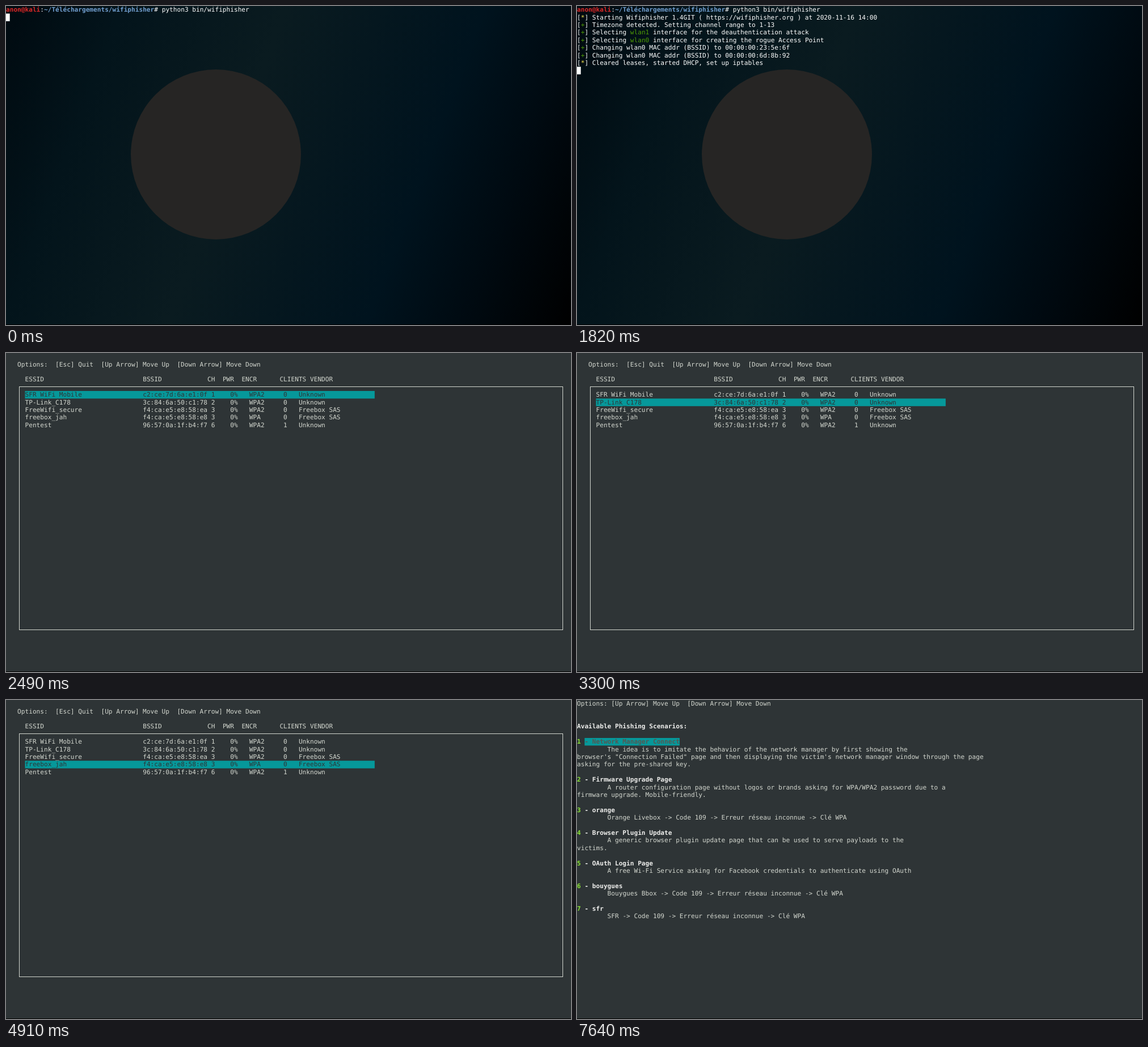
An HTML page for the animation above (8 s loop, 996 px wide and 563 px high).

```html
<!DOCTYPE html>
<html lang="en">
<head>
<meta charset="utf-8">
<title>Terminal session</title>
<style>
html, body { margin: 0; width: 100%; height: 100%; overflow: hidden; background: #000; }
svg { display: block; width: 996px; height: 563px; }
text {
  font: 11.13px "DejaVu Sans Mono", monospace;
  text-rendering: geometricPrecision;
  white-space: pre;
}
.bold { font-weight: bold; }
</style>
</head>
<body>
<svg viewBox="0 0 996 563">
  <defs>
    <linearGradient id="night" gradientUnits="userSpaceOnUse" x1="0" y1="0" x2="1059" y2="395">
      <stop offset="0" stop-color="#000a10"/>
      <stop offset=".17" stop-color="#03141b"/>
      <stop offset=".41" stop-color="#0a1b20"/>
      <stop offset=".55" stop-color="#05171f"/>
      <stop offset=".7" stop-color="#00131e"/>
      <stop offset=".84" stop-color="#000a11"/>
      <stop offset="1" stop-color="#000"/>
    </linearGradient>
  </defs>
  <rect width="996" height="563" fill="url(#night)"/>
  <circle cx="370" cy="262" r="150" fill="#262524"/>
  <g id="screen"></g>
  <rect y="562" width="996" height="1" fill="#000"/>
</svg>
<script>
const CELL_W = 6.7, CELL_H = 13.4, LOOP = 8000;
const SLATE = '#2e3436', GREY = '#d3d7cf', TEAL = '#06989a', WHITE = '#fff',
      GREEN = '#4e9a06', LIME = '#8ae234', YELLOW = '#fce94f', PALE = '#eeeeec';
const screen = document.getElementById('screen');

const escapeText = s => s.replace(/&/g, '&amp;').replace(/</g, '&lt;').replace(/>/g, '&gt;');

const put = (row, col, s, fill = GREY, bold = false) =>
  `<text x="${col * CELL_W}" y="${row * CELL_H + 10.2}" fill="${fill}"` +
  `${bold ? ' class="bold"' : ''}>${escapeText(s)}</text>`;

const bar = (row, col, cells, fill) =>
  `<rect x="${col * CELL_W}" y="${row * CELL_H}" width="${cells * CELL_W}" height="${CELL_H}" fill="${fill}"/>`;

// Lays out [text, colour, bold] pieces one after another.
function run(row, pieces) {
  let col = 0;
  return pieces.map(([s, fill = WHITE, bold]) => {
    const out = put(row, col, s, fill, bold);
    col += s.length;
    return out;
  }).join('');
}

const note = (mark, fill, ...rest) => [['['], [mark, fill], ['] '], ...rest];
const log = [
  note('*', YELLOW, ['Starting Wifiphisher 1.4GIT ( https://wifiphisher.org ) at 2020-11-16 14:00']),
  note('+', GREEN, ['Timezone detected. Setting channel range to 1-13']),
  note('+', GREEN, ['Selecting '], ['wlan1', GREEN], [' interface for the deauthentication attack']),
  note('+', GREEN, ['Selecting '], ['wlan0', GREEN], [' interface for creating the rogue Access Point']),
  note('+', GREEN, ['Changing wlan0 MAC addr (BSSID) to 00:00:00:23:5e:6f']),
  note('+', GREEN, ['Changing wlan0 MAC addr (BSSID) to 00:00:00:6d:8b:92']),
  note('*', YELLOW, ['Cleared leases, started DHCP, set up iptables'])
];

function shell(lines, cursor) {
  return run(0, [
    ['anon@kali', '#e02828', true], [':'],
    ['~/Téléchargements/wifiphisher', '#729fcf', true],
    ['# python3 bin/wifiphisher']
  ]) + log.slice(0, lines).map((pieces, i) => run(i + 1, pieces)).join('') +
    (cursor ? bar(lines + 1, 0, 1, WHITE) : '');
}

const panel = `<rect width="996" height="562" fill="${SLATE}"/>`;
const columns = (row, cols, cells, fill) => cells.map((s, i) => put(row, cols[i], s, fill)).join('');
const networks = [
  ['SFR WiFi Mobile', 'c2:ce:7d:6a:e1:0f', '1', '0%', 'WPA2', '0', 'Unknown'],
  ['TP-Link_C178', '3c:84:6a:50:c1:78', '2', '0%', 'WPA2', '0', 'Unknown'],
  ['FreeWifi_secure', 'f4:ca:e5:e8:58:ea', '3', '0%', 'WPA2', '0', 'Freebox SAS'],
  ['freebox_jah', 'f4:ca:e5:e8:58:e8', '3', '0%', 'WPA', '0', 'Freebox SAS'],
  ['Pentest', '96:57:0a:1f:b4:f7', '6', '0%', 'WPA2', '1', 'Unknown']
];

const finder = body => panel +
  put(1, 3, 'Options:  [Esc] Quit  [Up Arrow] Move Up  [Down Arrow] Move Down') +
  columns(3, [5, 36, 53, 57, 62, 72, 80], ['ESSID', 'BSSID', 'CH', 'PWR', 'ENCR', 'CLIENTS', 'VENDOR']) +
  `<rect x="23.5" y="59.5" width="958" height="429" fill="none" stroke="${GREY}"/>` + body;

const empty = () => finder(bar(5, 4, 40, TEAL) + put(5, 4, 'No access point has been discovered yet!', SLATE));

const list = (active, chosen) => finder(
  bar(5 + active, 5, 92, TEAL) +
  networks.map((cells, i) =>
    columns(5 + i, [5, 36, 54, 59, 64, 73, 77], cells, i === active ? SLATE : GREY)).join('') +
  (chosen ? put(40, 3, 'YOU HAVE SELECTED ' + networks[active][0]) : ''));

const scenarios = [
  ['Network Manager Connect',
    'The idea is to imitate the behavior of the network manager by first showing the',
    'browser\'s "Connection Failed" page and then displaying the victim\'s network manager window through the page',
    'asking for the pre-shared key.'],
  ['Firmware Upgrade Page',
    'A router configuration page without logos or brands asking for WPA/WPA2 password due to a',
    'firmware upgrade. Mobile-friendly.'],
  ['orange', 'Orange Livebox -> Code 109 -> Erreur réseau inconnue -> Clé WPA'],
  ['Browser Plugin Update',
    'A generic browser plugin update page that can be used to serve payloads to the',
    'victims.'],
  ['OAuth Login Page', 'A free Wi-Fi Service asking for Facebook credentials to authenticate using OAuth'],
  ['bouygues', 'Bouygues Bbox -> Code 109 -> Erreur réseau inconnue -> Clé WPA'],
  ['sfr', 'SFR -> Code 109 -> Erreur réseau inconnue -> Clé WPA']
];

function menu() {
  let row = 5;
  let out = panel + put(0, 0, 'Options: [Up Arrow] Move Up  [Down Arrow] Move Down') +
    put(3, 0, 'Available Phishing Scenarios:', PALE, true);
  scenarios.forEach(([name, ...lines], i) => {
    const title = '- ' + name;
    if (!i) out += bar(row, 2, title.length, TEAL);
    out += put(row, 0, String(i + 1), LIME, true) + put(row, 2, title, i ? PALE : '#555753', true);
    lines.forEach((s, j) => { out += put(row + 1 + j, j ? 0 : 8, s); });
    row += lines.length + 2;
  });
  return out;
}

const timeline = [
  [0, shell(0, true)],
  [120, shell(0)],
  [1140, shell(1)],
  [1260, shell(4)],
  [1380, shell(7)],
  [1820, shell(7, true)],
  [1940, empty()],
  [2490, list(0)],
  [3300, list(1)],
  [4080, list(2)],
  [4910, list(3)],
  [5700, list(4)],
  [6490, list(4, true)],
  [7640, menu()]
];

let start, shown = -1;
function tick(now) {
  start ??= now;
  const t = (now - start) % LOOP;
  const step = timeline.findLastIndex(([at]) => at <= t);
  if (step !== shown) {
    shown = step;
    screen.innerHTML = timeline[step][1];
  }
  requestAnimationFrame(tick);
}
requestAnimationFrame(tick);
</script>
</body>
</html>
```
